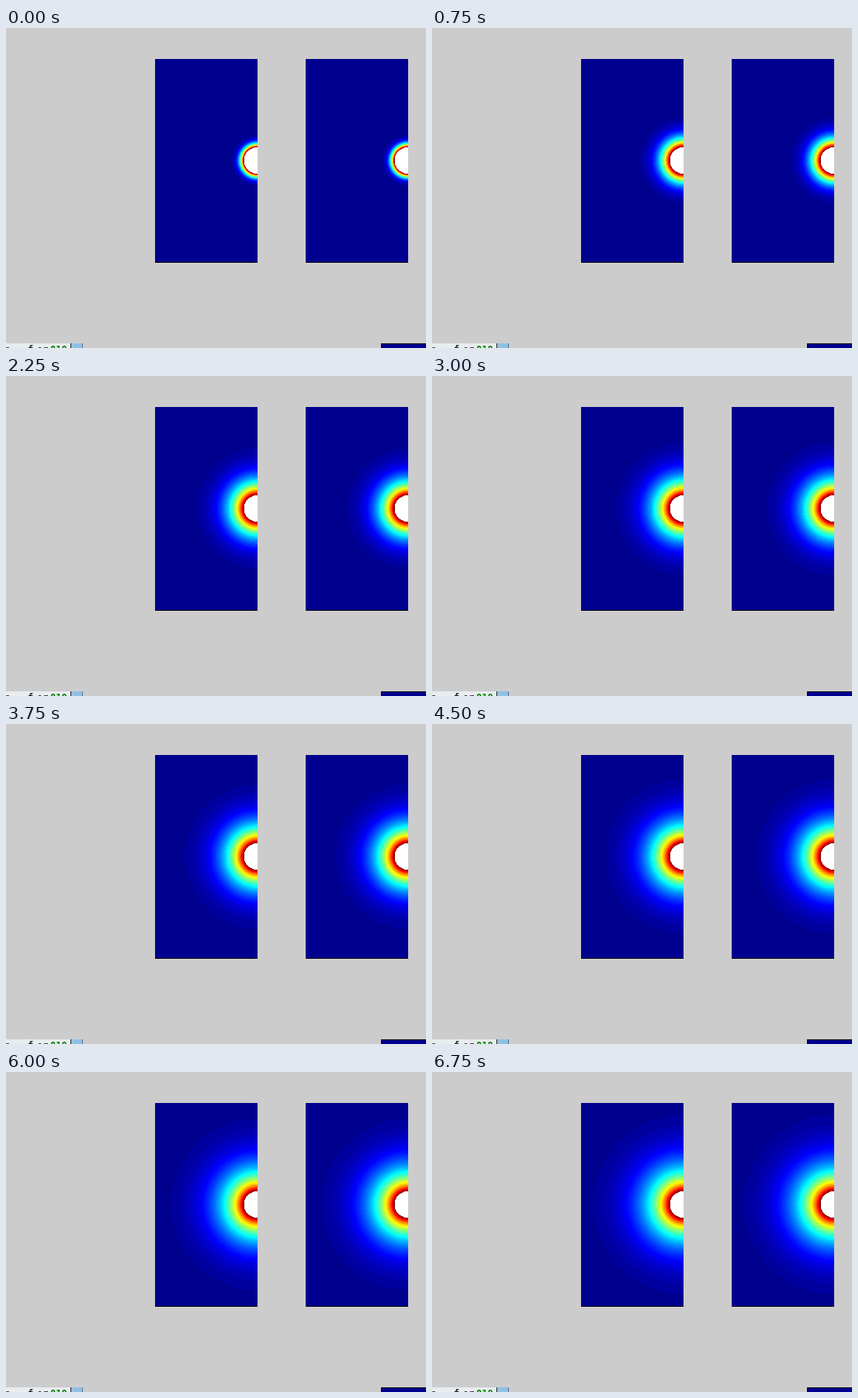
An HTML page with a canvas for the animation above (8250 ms loop, 541 px wide and 413 px high).

```html
<!DOCTYPE html>
<html lang="en">
<head>
<meta charset="utf-8">
<title>Diffusion around a disc</title>
<style>
  html, body { margin: 0; width: 100%; height: 100%; overflow: hidden; background: #ccc; }
  #stage { position: relative; width: 541px; height: 413px; overflow: hidden; background: #ccc; }
  #stage > * { position: absolute; }
  canvas { top: 40px; width: 132px; height: 262px; border-bottom: 1px solid #000; }
  #left { left: 192px; }
  #right { left: 386px; }
  #field { left: 0; top: 407px; width: 83px; height: 6px; overflow: hidden; background: #e9edf0; border-right: 1px solid #222; }
  #field span { position: absolute; top: 1px; font: bold 12px/14px "DejaVu Sans Mono", monospace; color: #222; white-space: pre; }
  #field .num { color: #008000; }
  #button { left: 84px; top: 407px; width: 14px; height: 6px; background: #8fc1e3; border-right: 1px solid #58738a; box-sizing: border-box; width: 15px; }
  #corner { left: 483px; top: 407px; width: 58px; height: 6px; box-sizing: border-box; background: #00008f; border: solid #000; border-width: 1px 0 0 1px; }
</style>
</head>
<body>
<div id="stage">
  <canvas id="left" width="132" height="262"></canvas>
  <canvas id="right" width="132" height="262"></canvas>
  <div id="field"><span style="left:-2px">c</span><span style="left:28px">f</span><span style="left:40px">or</span><span class="num" style="left:57px">010</span></div>
  <div id="button"></div>
  <div id="corner"></div>
</div>
<script>
const W = 132, H = 262, CX = 131.5, CY = 131, RADIUS = 17;
const STEP = 750, LAST = 9, LOOP = 8250;
const panels = ["left", "right"].map(id => document.getElementById(id).getContext("2d"));
const image = panels[0].createImageData(W, H);

const clamp = v => Math.max(0, Math.min(1, v));

// Jet colour map with 64 levels
const jet = Array.from({ length: 64 }, (_, i) => {
  const v = 4 * (i + 1) / 64;
  return [3, 2, 1].map(c => Math.round(255 * clamp(1.5 - Math.abs(v - c))));
});

function erfc(x) {
  const t = 1 / (1 + 0.3275911 * x);
  const poly = ((((1.061405429 * t - 1.453152027) * t + 1.421413741) * t - 0.284496736) * t + 0.254829592) * t;
  return poly * Math.exp(-x * x);
}

// Heat spreading outwards from a disc held at 1
function heat(r, spread) {
  return Math.sqrt(RADIUS / r) * erfc((r - RADIUS) / (2 * Math.sqrt(spread)));
}

function draw(step) {
  const spread = 24 + 126 * step;
  for (let y = 0, p = 0; y < H; y++) {
    for (let x = 0; x < W; x++, p += 4) {
      const r = Math.hypot(x + 0.5 - CX, y + 0.5 - CY);
      const rgb = r < RADIUS ? [255, 255, 255] : jet[Math.min(63, Math.floor(64 * heat(r, spread)))];
      image.data.set(rgb, p);
      image.data[p + 3] = 255;
    }
  }
  panels.forEach(c => c.putImageData(image, 0, 0));
}

let shown = -1;
function tick() {
  const step = Math.min(LAST, Math.floor(performance.now() % LOOP / STEP));
  if (step !== shown) draw(shown = step);
  requestAnimationFrame(tick);
}
tick();
</script>
</body>
</html>
```
